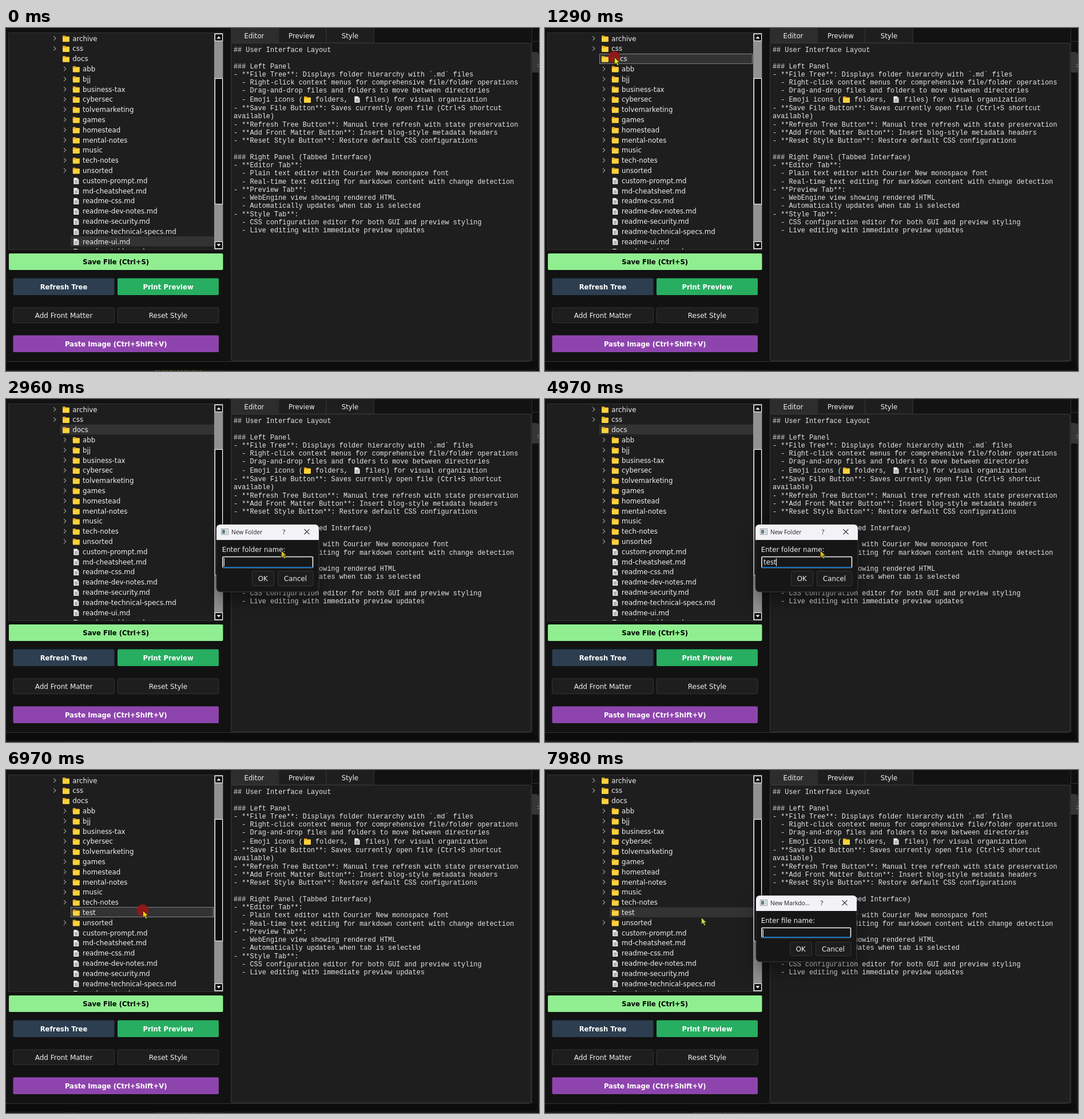
Animation, 932 px wide and 601 px high, one loop 8 s. Source, as an HTML page:

```html
<!DOCTYPE html>
<html lang="en">
<head>
<meta charset="utf-8">
<title>Notes editor</title>
<style>
  html, body { margin: 0; width: 100%; height: 100%; overflow: hidden; background: #121212; }
  svg { display: block; width: 932px; height: 601px; }
  text { font: 11.8px "DejaVu Sans", sans-serif; fill: #f0f0f0; white-space: pre; }
  .b { font-weight: bold; font-size: 11.6px; fill: #fff; }
  .plain { font-size: 12px; }
  .mono { font: 11.85px "Liberation Mono", monospace; fill: #e8e8e8; }
  .title { font: 10.3px "Open Sans", sans-serif; fill: #222; }
</style>
</head>
<body>
<svg id="stage" viewBox="0 0 932 601">
  <defs>
    <pattern id="mesh" width="2" height="2" patternUnits="userSpaceOnUse">
      <path d="M0 0H2V2H0Z" fill="#6c6c6c"/>
      <path d="M0 0H1V1H0ZM1 1H2V2H1Z" fill="#b8b8b8"/>
    </pattern>
    <clipPath id="treeClip"><rect x="5" y="9" width="374.5" height="379"/></clipPath>
  </defs>
  <g id="base"></g>
  <g id="live"></g>
</svg>
<script>
const LOOP = 8000, ROW = 17.8;
const base = document.getElementById('base');
const live = document.getElementById('live');

function add(parent, tag, attrs, text) {
  const e = document.createElementNS('http://www.w3.org/2000/svg', tag);
  for (const k in attrs) e.setAttribute(k, attrs[k]);
  if (text !== undefined) e.textContent = text;
  parent.appendChild(e);
  return e;
}
// Box given by its left, top, right and bottom edges.
const box = (g, l, t, r, b, fill, more) =>
  add(g, 'rect', { x: l, y: t, width: r - l, height: b - t, fill, ...more });
const path = (g, d, fill, more) => add(g, 'path', { d, fill, ...more });
const line = (g, d, stroke, width = 1) => path(g, d, 'none', { stroke, 'stroke-width': width });
const label = (g, x, y, s, cls = '', more) => add(g, 'text', { x, y, class: cls, ...more }, s);
const centred = (g, x, y, s, cls, more) => label(g, x, y, s, cls, { 'text-anchor': 'middle', ...more });
const group = (g, x, y) => add(g, 'g', { transform: `translate(${x} ${y})` });

// Icons are centred on x, y.
function folder(g, x, y) {
  const i = group(g, x, y);
  path(i, 'M-6 -4.5Q-6 -5.5 -5 -5.5H-1.5L0 -4H5Q6 -4 6 -3V0H-6Z', '#e9a820');
  path(i, 'M-6 -2.2H-1L0.5 -3.4H6V4.4Q6 5.4 5 5.4H-5Q-6 5.4 -6 4.4Z', '#ffd23c');
}
function openFolder(g, x, y) {
  const i = group(g, x, y);
  path(i, 'M-5.5 -5H-1.5L0 -3.5H4V4H-5.5Z', '#d89a1c');
  path(i, 'M-3 -1H6L4 5H-5.5Z', '#ffcf40');
}
function page(g, x, y) {
  const i = group(g, x, y);
  path(i, 'M-4.5 -5.5H1.5L4.5 -2.5V5.5H-4.5Z', '#f2f2f2');
  path(i, 'M1.5 -5.5V-2.5H4.5Z', '#9aa0a6');
  line(i, 'M-2.7 -.8H2.7M-2.7 1.2H2.7M-2.7 3.2H2.7', '#6d7680');
}
function trash(g, x, y) {
  const i = group(g, x, y);
  path(i, 'M-5 -5.5H5V-4H-5ZM-4.6 -3.5H4.6L3.6 5.8H-3.6Z', '#a8a8a8');
  line(i, 'M-3.6 -2L2.8 5M0 -3L3.4 1M3.6 -2L-2.8 5M0 -3L-3.4 1', '#333', .8);
}

const BODY = [
  '## User Interface Layout', '', '### Left Panel',
  '- **File Tree**: Displays folder hierarchy with `.md` files',
  '  - Right-click context menus for comprehensive file/folder operations',
  '  - Drag-and-drop files and folders to move between directories',
  '  - Emoji icons (',
  '- **Save File Button**: Saves currently open file (Ctrl+S shortcut', 'available)',
  '- **Refresh Tree Button**: Manual tree refresh with state preservation',
  '- **Add Front Matter Button**: Insert blog-style metadata headers',
  '- **Reset Style Button**: Restore default CSS configurations', '',
  '### Right Panel (Tabbed Interface)', '- **Editor Tab**:',
  '  - Plain text editor with Courier New monospace font',
  '  - Real-time text editing for markdown content with change detection',
  '- **Preview Tab**:', '  - WebEngine view showing rendered HTML',
  '  - Automatically updates when tab is selected',
  '- **Style Tab**:',
  '  - CSS configuration editor for both GUI and preview styling',
  '  - Live editing with immediate preview updates'
];

function button(l, t, r, b, fill, s, cls, more, stroke = 'none') {
  box(base, l, t, r, b, fill, { rx: 2, stroke });
  centred(base, (l + r) / 2, (t + b) / 2 + 4.5, s, cls, more);
}

function drawBase() {
  box(base, 0, 0, 932, 601, '#121212');
  // outer window edges
  box(base, 919, 0, 932, 601, '#0f0f0f');
  line(base, 'M919.5 0V584M919 23.5H932', '#303030');
  path(base, 'M920 42H926Q932 42 932 48V78H920Z', '#363636');
  line(base, 'M929 63.5H932M929 67.5H932', '#888');
  box(base, 0, 585, 930, 599, '#0c0c0c');
  line(base, 'M0 584.5H912Q919.5 584.5 919.5 577', '#333');
  line(base, 'M930.5 78V591Q930.5 599.5 921 599.5H0', '#232323');

  // left panel
  box(base, 4.5, 8.5, 379.5, 388.5, '#1e1e1e', { stroke: '#333' });
  button(5, 395, 379.5, 424, '#90ee90', 'Save File (Ctrl+S)', 'b', { style: 'fill:#000' });
  button(12.5, 438.5, 189.5, 468, '#2c3e50', 'Refresh Tree', 'b');
  button(195, 438.5, 372, 468, '#27ae60', 'Print Preview', 'b');
  button(12.5, 490, 189.5, 516.5, '#1e1e1e', 'Add Front Matter', 'plain', {}, '#333');
  button(195, 490, 372, 516.5, '#1e1e1e', 'Reset Style', 'plain', {}, '#333');
  button(12.5, 538.5, 372, 568, '#8e44ad', 'Paste Image (Ctrl+Shift+V)', 'b');

  // editor and tabs
  box(base, 393.5, 26.5, 918, 583, '#1e1e1e', { stroke: '#3a3a3a', rx: 2 });
  box(base, 393, 0, 476.5, 26, '#2d2d2d');
  box(base, 477, -1, 559.5, 26, '#1e1e1e', { stroke: '#333' });
  box(base, 560, -1, 643.5, 26, '#1e1e1e', { stroke: '#333' });
  centred(base, 434, 18, 'Editor');
  centred(base, 517, 18, 'Preview');
  centred(base, 601.5, 18, 'Style');
  BODY.forEach((s, i) => {
    const shift = i < 6 ? 0 : i === 6 ? 1.3 : 2.2;
    if (s) label(base, 398, 42 + 14.27 * i + shift, s, 'mono');
  });
  folder(base, 527, 125.5);
  label(base, 534, 128.9, ' folders,', 'mono');
  page(base, 614, 125.3);
  label(base, 621, 128.9, ' files) for visual organization', 'mono');
}

const TOP = ['archive', 'css', 'docs'];
const DIRS = ['abb', 'bjj', 'business-tax', 'cybersec', 'tolvemarketing', 'games',
  'homestead', 'mental-notes', 'music', 'tech-notes', 'unsorted'];
const FILES = ['custom-prompt', 'md-cheatsheet', 'readme-css', 'readme-dev-notes',
  'readme-security', 'readme-technical-specs', 'readme-ui', 'readme-tables'];

function drawTree(s) {
  const g = add(live, 'g', { 'clip-path': 'url(#treeClip)' });
  const dirs = s.made ? [...DIRS.slice(0, -1), 'test', 'unsorted'] : DIRS;
  const names = [...TOP, ...dirs, ...FILES.map(f => f + '.md')];
  const rowBox = (i, fill) => {
    const y = 18 + ROW * i;
    box(g, i < 3 ? 95 : 113, y - 8.9, 364, y + 8.7, fill);
  };
  if (s.hover !== undefined) rowBox(s.hover, '#1f2b35');
  rowBox(s.sel, '#333');
  names.forEach((name, i) => {
    const y = 18 + ROW * i, inner = i < 3 ? 0 : 17.8;
    const isFile = name.endsWith('.md');
    (isFile ? page : folder)(g, 105 + inner, y + .8);
    label(g, 116.3 + inner, y + 4.5, name);
    if (!isFile && name !== 'docs' && name !== 'test')
      line(g, `M${83.3 + inner} ${y - 3.5}l3.6 3.7l-3.6 3.7`, '#999', 1.2);
  });
  if (s.focus) {
    const y = Math.round(18 + ROW * s.sel);
    box(g, s.sel < 3 ? 95.5 : 113.5, y - 8.5, 362.5, y + 8.5, 'none',
      { stroke: '#d8d8d8', 'stroke-dasharray': '1 1' });
  }
  // scroll bar
  const [a, b] = s.made ? [86.5, 299.5] : [88.5, 308.5];
  box(g, 364, 9, 379.5, 388, 'url(#mesh)');
  box(g, 365.5, a, 378.5, b, '#0c0c0c', { stroke: '#fff' });
  for (const [y, dir] of [[16.5, -1], [380.5, 1]]) {
    box(g, 365.5, y - 6, 378.5, y + 6, '#0c0c0c', { stroke: '#fff' });
    path(g, `M368.5 ${y - 2 * dir}h7l-3.5 ${4 * dir}Z`, '#fff');
  }
}

function drawMenu([x, y]) {
  const g = group(live, x, y);
  box(g, 0, 0, 179.5, 93, '#141414', { style: 'filter:drop-shadow(0 1px 1px #0006)' });
  line(g, 'M8 45.5H172', '#191919');
  page(g, 26.5, 12.5);
  openFolder(g, 26.5, 33);
  box(g, 20, 57, 29, 63, '#eee', { rx: 3 });
  line(g, 'M22 60H27.5', '#333', 1.2);
  trash(g, 26.5, 79.5);
  label(g, 37.3, 16.3, 'New File in Folder');
  label(g, 37.3, 36.3, 'New Subfolder');
  label(g, 33.8, 63.7, 'Rename Folder');
  label(g, 37.3, 83.3, 'Delete Folder');
}

const DIALOGS = {
  folder: { l: 368, r: 547, b: 338, title: 'New Folder', ask: 'Enter folder name:' },
  file: { l: 369, r: 545, b: 336, title: 'New Markdo...', ask: 'Enter file name:' }
};

function drawDialog({ l, r, b, title, ask }, s) {
  const g = add(live, 'g', {});
  box(g, l, 220, r, b, '#161616',
    { rx: 7, stroke: '#3a3a3a', style: 'filter:drop-shadow(0 14px 15px #0006)' });
  path(g, `M${l} 247V227Q${l} 220 ${l + 7} 220H${r - 7}Q${r} 220 ${r} 227V247Z`, '#f3f3f7');
  box(g, 376.5, 227.5, 388.5, 237.5, '#fafafa', { stroke: '#9a9a9a' });
  box(g, 378, 229, 383, 236, '#5e7f86');
  box(g, 384, 229, 387, 236, '#c9cdd2');
  label(g, 394, 237, title, 'title');
  centred(g, r - 61, 237, '?', 'title', { style: 'font-size:11.5px' });
  line(g, `M${r - 25.5} 228.2l9 9m0 -9l-9 9`, '#222', 1.1);
  label(g, 377.7, 268.2, ask);
  const edge = r - 10.5, low = b - 42.5;
  box(g, 379, 276.5, edge, low, '#171717', { stroke: '#f4f4f4', 'stroke-width': 1.6, rx: 1 });
  line(g, `M379 ${low - .3}H${edge}`, '#1273c4', 1.8);
  const typed = label(g, 382, 290, s.typed);
  if (s.caret) {
    const x = 381 + (s.typed ? typed.getComputedTextLength() + .5 : 0);
    box(g, x, 279, x + 1, 293, '#fff');
  }
  for (const [x1, x2, name] of [[r - 117, r - 78.5, 'OK'], [r - 72, r - 10, 'Cancel']]) {
    box(g, x1 + .5, 301.5, x2, b - 10.5, '#1d1d1d', { stroke: '#353535', rx: 2 });
    centred(g, (x1 + x2) / 2, (b + 291) / 2 + 4.4, name);
  }
}

function drawPointer([x, y], tint, click) {
  if (click) add(live, 'circle', { cx: x, cy: y, r: 10.5, fill: '#961616', opacity: .92 });
  path(group(live, x, y), 'M.4 .4V12.6L3.3 10.2L5.6 15L7.8 13.9L5.6 9.3H9.6Z', tint,
    { stroke: '#111', 'stroke-width': .7 });
}

// Each step changes only the listed parts of the state.
const STEPS = [
  [0, { sel: 20, tint: '#d6ee08', strip: '#5c5a12' }],
  [330, { hover: 15, at: [215, 291] }],
  [640, { hover: 9, at: [205, 172] }],
  [960, { hover: 2, at: [121, 51] }],
  [1290, { hover: undefined, sel: 2, focus: true, click: true, strip: '#4a2020' }],
  [1630, { click: false, menu: [121, 51], at: [124, 53] }],
  [1960, { at: [191, 79] }],
  [2290, { at: [191, 83] }],
  [2620, { menu: null, focus: false, at: [194, 84], strip: '#2c2c2c' }],
  [2960, { dialog: 'folder', typed: '', caret: true, at: [481, 265], tint: '#d0bc10' }],
  [3290, { caret: false }],
  [3640, { caret: true }],
  [4300, { caret: false }],
  [4640, { caret: true, typed: 't' }],
  [4970, { typed: 'test' }],
  [5640, { dialog: null, made: true, sel: 13, focus: true, at: [475, 256], tint: '#ecd010' }],
  [6310, { at: [381, 260] }],
  [6640, { at: [247, 254] }],
  [6970, { at: [239, 246], click: true }],
  [7300, { click: false, menu: [239, 246], at: [263, 253] }],
  [7650, { at: [265, 255] }],
  [7980, { menu: null, focus: false, dialog: 'file', typed: '', at: [273, 258], tint: '#bcd844' }]
];
const states = [];
for (const [, change] of STEPS) states.push({ ...states[states.length - 1], ...change });

function draw(s) {
  live.replaceChildren();
  add(live, 'path', { d: 'M260 600.5H345', stroke: s.strip, 'stroke-dasharray': '5 2 3 3' });
  add(live, 'path', { d: 'M102 600.5H125M346 600.5H380', stroke: '#282828', 'stroke-dasharray': '4 3' });
  drawTree(s);
  if (s.menu) drawMenu(s.menu);
  if (s.dialog) drawDialog(DIALOGS[s.dialog], s);
  if (s.at) drawPointer(s.at, s.tint, s.click);
}

let shown = -1;
const start = performance.now();
function tick() {
  const t = (performance.now() - start) % LOOP;
  let i = STEPS.length - 1;
  while (STEPS[i][0] > t) i--;
  if (i !== shown) draw(states[shown = i]);
  requestAnimationFrame(tick);
}
drawBase();
tick();
</script>
</body>
</html>
```
